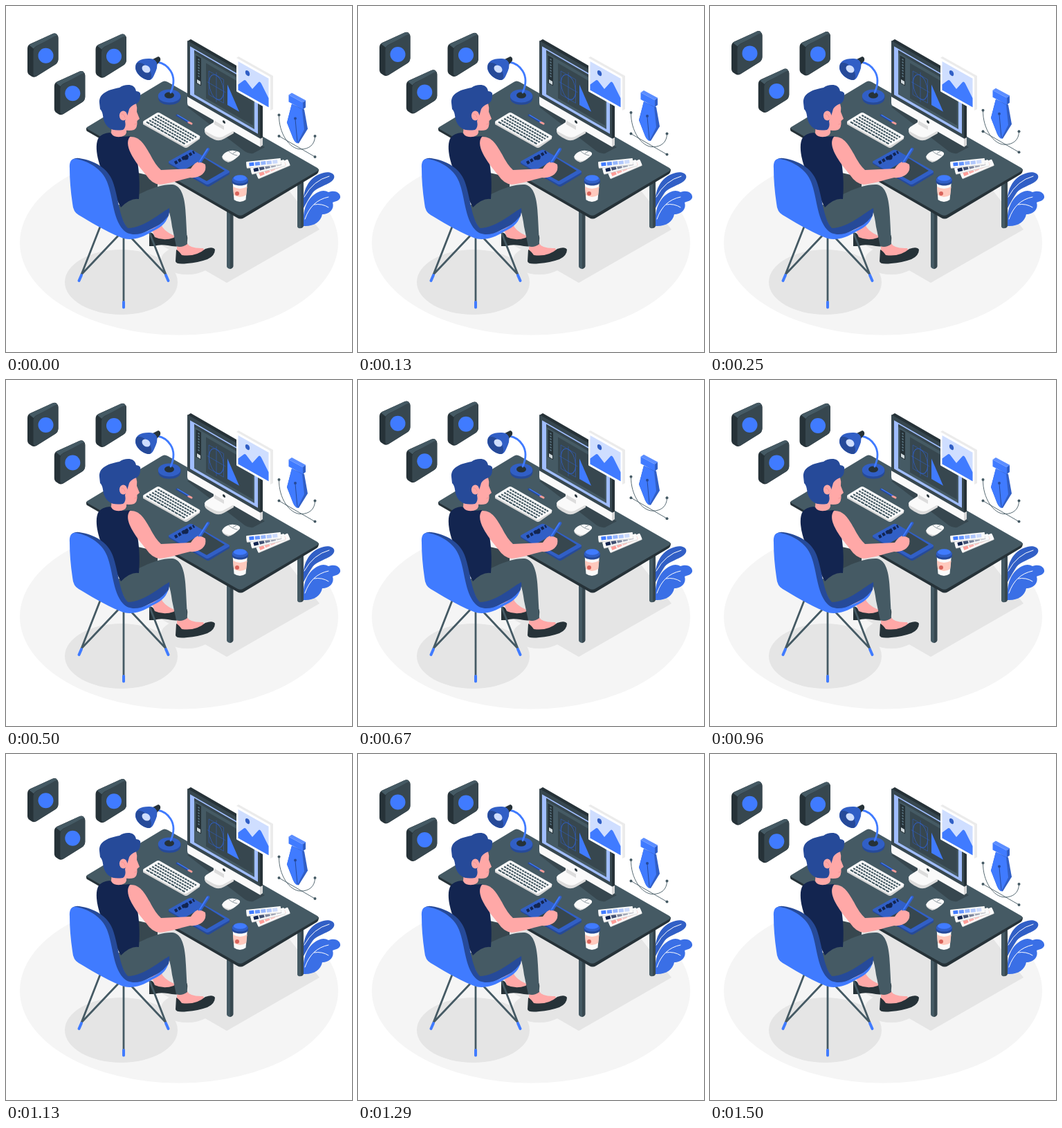
An HTML page that plays this animation: 500x500 px, repeating every 1540 ms.

```html
<!DOCTYPE html>
<html lang="en">
<head>
<meta charset="utf-8">
<title>Designer at a desk</title>
<style>
  html, body { margin: 0; height: 100%; overflow: hidden; background: #fff; }
  svg { display: block; width: 100%; height: 100%; }
  .blue { fill: #407bff; }
  .deep { fill: #264a99; }
  .mid { fill: #315fc6; }
  .pale { fill: #a0bdff; }
  .navy { fill: #132550; }
  .slate { fill: #455a64; }
  .dusk { fill: #37474f; }
  .ink { fill: #263238; }
  .skin { fill: #ffa8a7; }
  .shade { fill: #e5e5e5; }
  .paper { fill: #fafafa; }
  .line { fill: none; stroke-linecap: round; stroke-linejoin: round; }
</style>
</head>
<body>
<svg viewBox="0 0 500 500">
  <defs>
    <g id="tile">
      <path class="ink" d="M31 62Q31 57 35 55L66 41Q72 38 74 42Q75.500 43 75.500 46V77Q75.500 82 71 85L44 102Q40 104 37 102L34 100Q31 98 31 94Z"/>
      <path class="slate" d="M33 56.500L66 41Q72 38 74.500 43L44 58Q41 60 40 62Z"/>
      <path class="dusk" d="M39.500 66Q39.500 61 44 58.500L70 44Q75.500 41 75.500 47V77Q75.500 82 71 85L45 101Q39.500 104 39.500 98Z"/>
      <circle class="blue" cx="57.500" cy="72" r="11"/>
    </g>
  </defs>

  <g id="floor">
    <ellipse cx="250" cy="342" rx="230" ry="133.500" fill="#f5f5f5"/>
    <path class="shade" d="M319 400L453 323L380 230H208V336Z"/>
    <ellipse class="shade" cx="262" cy="367" rx="38" ry="21"/>
    <ellipse class="shade" cx="166.500" cy="399" rx="81.500" ry="47"/>
  </g>

  <g id="plant">
    <path class="mid" d="M430 292C427 268 437 246 459 241C472 238 479 246 471 253C462 260 449 262 443 270Q437 279 430 292Z"/>
    <path fill="#3a6fe6" d="M430 318C428 295 435 277 451 269Q459 265 466 269C477 265 484 271 483 277C481 282 476 282 472 284C475 294 467 301 457 301C455 312 444 319 430 318Z"/>
    <path class="line" stroke="#fff" d="M431 276Q444 252 467 246M432 308Q441 281 466 276M445 287Q457 285 466 291"/>
  </g>

  <g id="desk">
    <path class="slate" d="M421 248H426V321Q422 322 421 319ZM319 290H324V380Q319 379 319 376Z"/>
    <path class="dusk" d="M426 248H430V318Q429 321 426 321ZM324 290H328.500V376Q328 379 324 380Z"/>
    <path class="ink" d="M116 176V179Q116 181 119 182L334 306Q339 309 344 306L449 243Q452 241 452 236Z"/>
    <path class="slate" d="M118 174.500L225 110Q229 107 234 110L450 234Q453 236 450 238.500L343 301.500Q339 304 334 301.500L118 178Q115 176 118 174.500Z"/>
    <path class="dusk" d="M262 146L268 144L374 204L357 213Q351 214 345 210Z"/>
  </g>

  <g id="lamp">
    <path class="deep" d="M220 129H252.500V133C252 146 220 146 220 133Z"/>
    <ellipse class="mid" cx="236" cy="130" rx="16.200" ry="9.500"/>
    <ellipse class="ink" cx="236" cy="129" rx="7" ry="4.600"/>
    <path class="line" stroke="#407bff" stroke-width="2.800" d="M238 125Q246 107 238 94Q231 83 219 81"/>
    <path class="ink" d="M212 77L220 73Q224 74 223 79L217 86Z"/>
    <path class="mid" d="M187 88Q188 76 206 76Q215 75 218 82Q220 88 214 100Q211 107 207 107C198 107 186 97 187 88Z"/>
    <path class="deep" d="M187.500 86C188 80 196 80 204 88C211 95 212 106 207 107C198 107 186 97 187.500 86Z"/>
    <ellipse cx="202.500" cy="91" rx="6.500" ry="5" transform="rotate(38 202.500 91)" fill="#cfdeff"/>
  </g>

  <g id="keyboard">
    <path fill="#d5d5d5" d="M198 168V171L257 204Q260 206 263 204L280 192V188Z"/>
    <path class="paper" d="M199 166L217 155Q220 153 223 155L279 187Q282 189 279 191L262 201Q259 203 256 201L199 169Q197 168 199 166Z"/>
    <g id="keys" class="line" style="stroke-linecap:butt" stroke="#455a64" stroke-width="2.200"></g>
  </g>
  <g class="line" stroke-width="3">
    <path stroke="#264a99" d="M247 158L264 168"/>
    <path stroke="#ff9d98" d="M264 168L268 170"/>
    <path stroke="#407bff" stroke-width="1.300" d="M248 157.500L264 167"/>
  </g>

  <g id="monitor">
    <path fill="#dcdcdc" d="M287 177V182Q288 187 301 193Q308 196 315 192L329 184V178Z"/>
    <path class="paper" d="M289 175L300 168V158L318 168V173L327 176Q331 179 326 182L313 189Q307 191 301 188L290 182Q285 179 289 175Z"/>
    <path fill="#dcdcdc" d="M301 164L315 171V179L301 171Z"/>
    <path class="ink" d="M262 51L267 48L371 108V192L366 190Z"/>
    <g transform="matrix(1 .577 0 1 262 50)">
      <rect class="dusk" width="105" height="83" rx="1"/>
      <path class="paper" d="M0 81H105V93H2Q0 93 0 90Z"/>
      <rect class="pale" x="4" y="6" width="98" height="70"/>
      <rect class="slate" x="10" y="8" width="87" height="64"/>
      <rect class="dusk" x="10" y="8" width="87" height="4"/>
      <rect class="ink" x="12.500" y="14" width="7.500" height="40"/>
      <path class="line" stroke="#607d8b" stroke-dasharray="2 2" stroke-width="2" style="stroke-linecap:butt" d="M16.500 17V45"/>
      <rect x="14" y="48" width="5" height="5" fill="#cfd8dc"/>
      <rect class="dusk" x="27" y="17" width="68" height="51"/>
      <g class="line" stroke="#315fc6" stroke-width=".8">
        <ellipse cx="42" cy="43" rx="10.500" ry="17"/>
        <path stroke-width=".5" d="M31.500 26H52.500V60H31.500ZM42 22V64M29 43H55"/>
      </g>
      <path class="blue" d="M58 30V59.500H75Z"/>
      <circle class="ink" cx="53" cy="87" r="2"/>
    </g>
    <path fill="#d8d8d8" d="M367 192L371 190V201L367 204Z"/>
  </g>

  <g id="picture">
    <path fill="#ebebeb" d="M333 75L336 73L386 101V149L382 151Z"/>
    <g transform="matrix(1 .565 0 1 333 75)">
      <rect width="49" height="48.500" rx="1" fill="#fff"/>
      <rect x="2.500" y="3.500" width="44" height="41.500" fill="#cfdeff"/>
      <path class="blue" d="M2.500 45V37L11 26Q13 24 15 26L23 32L32 17Q34 14 36 17L46.500 32V45Z"/>
      <ellipse class="mid" cx="16" cy="13" rx="3.200" ry="3.700"/>
    </g>
  </g>

  <g id="mouse">
    <path fill="#d5d5d5" d="M312 217Q312 223 321 226Q328 225 338 215V212Z"/>
    <path class="paper" d="M313 216C316 211 324 208 329 209Q339 210 338 214C335 219 327 224 322 224Q311 221 313 216Z"/>
    <path class="line" stroke="#455a64" stroke-width=".6" d="M322 210Q327 215 334 216M328 213L333 210"/>
  </g>

  <g id="swatches"></g>

  <g id="cup">
    <path class="paper" d="M327.500 252H349L346.500 280Q338 286 329.500 280Z"/>
    <path fill="#ffc9bd" d="M328 261Q338 267 348.500 261L347.200 273Q338 279 329 273Z"/>
    <circle cx="334" cy="271" r="3" fill="#d9635b"/>
    <path class="deep" d="M326.500 252L328 247H348L350 252V255C347 261 330 261 326.500 255Z"/>
    <ellipse class="mid" cx="338.300" cy="251" rx="11.500" ry="5.500"/>
    <ellipse class="blue" cx="338.300" cy="248.500" rx="9.500" ry="4.300"/>
  </g>

  <g id="tablet">
    <path class="deep" d="M235 225V228L289 260Q292 262 295 260L323 243V239Z"/>
    <path class="mid" d="M236 224L264 208.500Q267 207 270 208.500L322 238Q324 239.500 322 241L294 257Q291 259 288 257L236 227Q234 225 236 224Z"/>
    <path class="dusk" d="M259 236L287 220L316 238L290 253Z"/>
    <path class="line" stroke="#132550" stroke-width="4.500" stroke-dasharray="4 2" style="stroke-linecap:butt" d="M244 227L272 211"/>
    <ellipse class="navy" cx="259" cy="219.500" rx="4.500" ry="3"/>
  </g>

  <g id="person">
    <path class="dusk" d="M186 240L212 246Q220 250 219 262L196 279H186Z"/>
    <path class="skin" d="M209 319L224 315Q227 325 243 332L244 339L218 341Z"/>
    <path class="ink" d="M207 328Q212 326 215 334Q228 340 242 335Q248 328 260 329Q264 334 261 343Q250 350 234 346Q222 344 214 347H207Z"/>
    <path class="skin" d="M247 344L261 342Q266 351 285 350L289 359L257 364L247 356Z"/>
    <path class="ink" d="M246 352Q250 354 254 360Q274 363 288 351Q299 347 302 352Q302 361 291 366Q277 371 262 372Q246 374 245 369Z"/>
    <path class="slate" d="M158 290C185 276 215 257 241 258C254 260 259 277 260 305L262 344Q254 350 246 347L240 319Q238 304 235 295C215 307 195 324 176 324Z"/>
    <path class="navy" d="M150 183C160 190 170 189 179 188C190 211 195 247 192 279Q180 277 166 291L148 256C134 234 126 203 134 190Q139 184 150 183Z"/>
    <path class="skin" d="M153 172H174V183Q172 190 160 189Q153 188 152 183Z"/>
    <path class="skin" d="M165 142L188 141Q190 147 189 153L193 163L189.500 166Q190 177 185 179Q178 181 171 179L164 170Z"/>
    <path class="deep" d="M135 140C134 126 148 121 164 118C171 113 186 111 188 123Q196 124 194 130Q194 140 186 142Q180 145 178 149L176 156L172 166Q174 176 169 179Q155 181 149 176C137 166 143 156 136 149Z"/>
    <ellipse class="skin" cx="169.500" cy="158.500" rx="5.600" ry="7"/>
    <path class="line" stroke="#f28e8f" stroke-width=".8" d="M167 156Q171 156 172 161M186 171L189 170"/>
    <path class="skin" d="M179 189C193 188 200 200 208 214Q216 230 224 237L267 235Q274 224 280 225L288 230Q290 237 284 243Q277 249 266 248C250 252 234 257 222 258Q211 257 203 245C191 230 168 203 179 189Z"/>
    <path class="line" stroke="#315fc6" stroke-width="4.500" d="M280 226L292 207"/>
    <path class="line" stroke="#407bff" stroke-width="2" d="M279.500 225L291 207"/>
    <path class="skin" d="M273 229Q280 223 288 229Q289 235 284 239Q278 237 273 229Z"/>
  </g>

  <g id="chair">
    <path class="line" stroke="#455a64" stroke-width="2.800" d="M136 319L109 388L164 330M208 329L231 388L181 335M170 335V428"/>
    <path class="line" stroke="#407bff" stroke-width="4" d="M109 389L105.500 397M231 389L234.500 397M170 428V435.500"/>
    <path class="deep" d="M94 224Q98 219 106 220C127 223 147 234 154 253C163 277 163 306 176 321C200 320 217 303 236 292Q238 303 228 313L185 335L160 325Z"/>
    <path class="blue" d="M92 235C91 223 96 220 102 221C121 225 139 236 146 254C155 277 154 306 169 323C178 333 192 331 205 325Q223 318 234 304C231 315 222 321 211 326C194 337 177 340 165 334C143 325 120 311 105 302Q97 298 96 285Q92 258 92 235Z"/>
  </g>

  <g class="float" data-rise="10">
    <use href="#tile"/>
    <use href="#tile" x="98.500" y="1"/>
    <use href="#tile" x="38.800" y="54.500"/>
  </g>

  <g class="float" data-rise="20">
    <path class="mid" d="M413 142L431 150L436 178L423 199Q418 199 415 192L406 169Z"/>
    <path class="blue" d="M413 142L428 150L431 179L421 199Q418 198 415 192L406 169Z"/>
    <path class="mid" d="M428 140L433 137V147L429 150Z"/>
    <path class="blue" d="M408.500 129L429 140V150L408.500 139Z"/>
    <path fill="#5c8eff" d="M408.500 129L413 126L433.500 137L429 140Z"/>
    <path class="line" stroke="#264a99" d="M418 164L421 197"/>
    <circle class="deep" cx="418" cy="163" r="2"/>
    <path class="line" stroke="#455a64" stroke-width=".9" d="M394.500 158C394 185 410 207.500 426 207.500C438 207.500 446.500 201 446.500 188.500M394.500 188.500L446.500 218.500"/>
    <g class="slate">
      <circle cx="394.500" cy="158" r="2"/>
      <circle cx="394.500" cy="188.500" r="2"/>
      <circle cx="446.500" cy="188.500" r="2"/>
      <circle cx="446.500" cy="218.500" r="2"/>
    </g>
  </g>
</svg>
<script>
  const LOOP = 1540, FPS = 24, CYCLE = 36; // one bob takes 36 steps
  const byId = id => document.getElementById(id);

  // Keyboard rows: dashed lines along the long side.
  byId('keys').innerHTML = [0, 1, 2, 3, 4].map(row =>
    `<path stroke-dasharray="${row ? 3.2 : 5} .9" d="M${203 + row * 4.1} ${167.5 - row * 2.4}l55.5 31.8"/>`
  ).join('');

  // Fanned colour cards: x, y, angle and base colour.
  const card = ([x, y, angle, colour]) => `
    <g transform="translate(${x} ${y}) rotate(${angle})">
      <rect y="1" width="50" height="9" rx="1" fill="#d5d5d5"/>
      <rect width="50" height="9" rx="1" fill="#fafafa"/>
      ${[1, .8, .55, .4, .25].map((alpha, i) =>
        `<rect x="${4 + i * 8.5}" y="2" width="7" height="5" fill="${colour}" opacity="${alpha}"/>`).join('')}
    </g>`;
  byId('swatches').innerHTML = [
    [361, 241, -23, '#ff9d98'],
    [353, 234, -14, '#132550'],
    [347, 225, -6, '#407bff']
  ].map(card).join('');

  const floats = document.querySelectorAll('.float');

  // Linear rise and fall, stepped at the frame rate.
  function draw(now) {
    const step = Math.floor((now % LOOP + 5) * FPS / 1000);
    const phase = (step + .5) % CYCLE / CYCLE;
    const lift = 1 - Math.abs(2 * phase - 1);
    for (const el of floats) el.setAttribute('transform', `translate(0 ${-el.dataset.rise * lift})`);
    requestAnimationFrame(draw);
  }
  draw(0);
</script>
</body>
</html>
```
